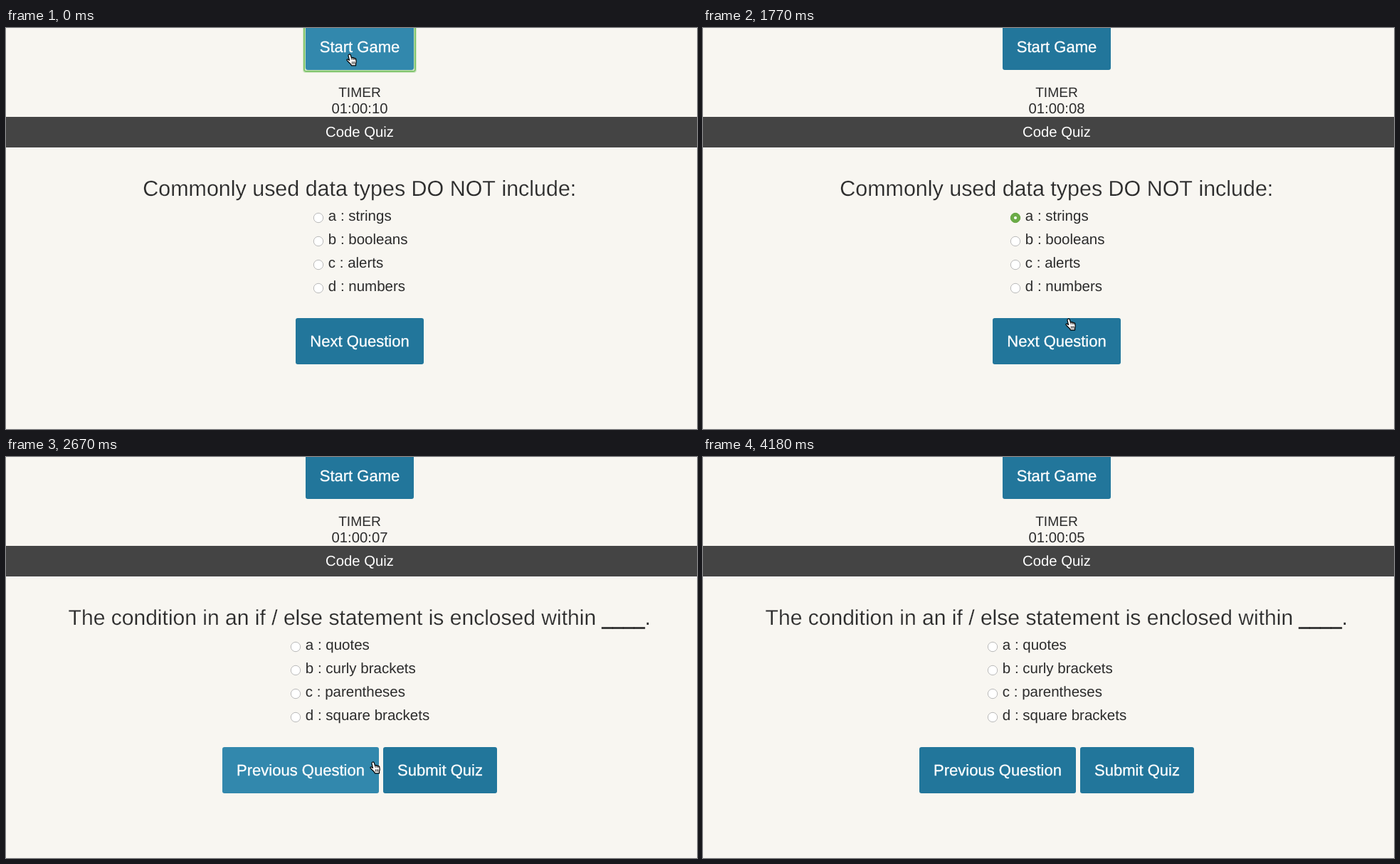
Recreate the animation shown at these times as an HTML page. Size 971 by 564 pixels, loop 4280 ms.

```html
<!DOCTYPE html>
<html lang="en">
<head>
<meta charset="utf-8">
<title>Code Quiz</title>
<style>
  html, body { margin: 0; width: 100%; height: 100%; overflow: hidden; background: #f8f6f1; }
  svg { display: block; width: 971px; height: 564px; }
  text {
    font: 20.3px "Liberation Sans", Arial, sans-serif;
    font-kerning: none; text-rendering: geometricPrecision;
    fill: #2b2b2b;
  }
  .mid { text-anchor: middle; }
  .bar { fill: #fff; }
  .question { stroke: #f8f6f1; stroke-width: .25px; /* thins the large letters */ }
  .blank { font-size: 27px; stroke: #2b2b2b; stroke-width: .6px; }
  .answer { font-size: 20.5px; }
  .button text { font-size: 22px; fill: #fff; stroke: #fff; stroke-width: .3px; text-anchor: middle; }
  .button .face { fill: #22769b; }
  .button.hover .face { fill: #3288ad; }
  .ring { fill: none; visibility: hidden; }
  .focus .ring { visibility: visible; }
  .radio { fill: #fff; stroke: #b9b9b9; }
  .radio.pressed { fill: #e2e2e2; stroke: #9c9c9c; }
  .radio.turning { fill: #98c680; stroke: #8cba74; }
  .radio.checked { fill: #6cac48; stroke: #64a441; }
</style>
</head>
<body>
<svg id="stage" viewBox="0 0 971 564">
  <rect width="971" height="564" fill="#f8f6f1"/>
  <rect y="125" width="971" height="43" fill="#444"/>
  <text class="mid" x="497" y="96.5" style="font-size:19.2px">TIMER</text>
  <text class="mid" x="497" y="119.7" id="timer"></text>
  <text class="mid bar" x="497" y="153">Code Quiz</text>
  <g id="slides"></g>
  <g id="buttons"></g>
  <g id="arrow">
    <path d="M1.7 1.3v14.9l3.5-3.3 2.2 5.1 2.6-1.1-2.2-4.9h4.5z" fill="#000" stroke="#fff"/>
  </g>
  <g id="hand" stroke="#000" stroke-linejoin="round" stroke-linecap="round">
    <path d="M4 1.2c1-.6 2 0 2.3.9l1.3 4.1c.5-.9 1.8-.8 2.2.1.6-.6 1.7-.4 2 .5.7-.5 1.8-.1 1.9.9l.5 3.3c.2 1.5-.6 2.3-.7 3.6l.1 2.2H7.4c-.5-2.1-2.5-3.2-4-4.8L1.2 9.6c-.7-1 .4-2.1 1.5-1.4l1.8 1.2L3 3.2c-.2-.9.2-1.6 1-2z" fill="#fff" stroke-width="1.2"/>
    <path d="M7.6 6.4l.6 2.2M9.9 6.6l.5 2M11.9 7.1l.3 1.6M8.4 11.6v2.8M10.3 11.6v2.8M12 11.6v2.8" fill="none" stroke-width=".8"/>
  </g>
</svg>
<script>
const LOOP = 4280;
const $ = id => document.getElementById(id);

function add(parent, tag, attrs, content = "") {
  const node = document.createElementNS("http://www.w3.org/2000/svg", tag);
  for (const name in attrs) node.setAttribute(name, attrs[name]);
  node.innerHTML = content;
  return parent.appendChild(node);
}

function addSlide(question, x, size, left, answers) {
  const slide = add($("slides"), "g", {});
  add(slide, "text", { class: "question", x, y: 236, style: `font-size:${size}px` }, question);
  answers.forEach((answer, i) => {
    add(slide, "circle", { class: "radio", cx: left, cy: 267 + 33 * i, r: 6.7 });
    add(slide, "text", { class: "answer", x: left + 13.8, y: 271 + 33 * i }, `${"abcd"[i]} : ${answer}`);
  });
  return slide;
}

function addButton(label, x, y, width) {
  const group = add($("buttons"), "g", {});
  const box = (grow, attrs) => add(group, "rect", {
    x: x - grow, y: y - grow, width: width + 2 * grow, height: 65 + 2 * grow, rx: 3, ...attrs
  });
  box(3.2, { class: "ring", stroke: "#cfe5c4", "stroke-width": 1.5 });
  box(2, { class: "ring", stroke: "#83c56f", "stroke-width": 2 });
  box(.5, { class: "ring", stroke: "#c3e2b5" });
  box(0, { class: "face" });
  add(group, "text", { x: x + width / 2, y: y + 40 }, label);
  return group;
}

const first = addSlide("Commonly used data types DO NOT include:", 192.3, 30.45, 439,
  ["strings", "booleans", "alerts", "numbers"]);
const second = addSlide(
  'The condition in an if / else statement is enclosed within <tspan class="blank">____</tspan>.',
  87.6, 30.05, 407, ["quotes", "curly brackets", "parentheses", "square brackets"]);
const choice = first.querySelector(".radio");
const dot = add(first, "circle", { cx: 439, cy: 267, r: 2, fill: "#fff" });

const start = addButton("Start Game", 421, -6, 152);
const next = addButton("Next Question", 407, 408, 180);
const previous = addButton("Previous Question", 304, 408, 220);
const submit = addButton("Submit Quiz", 530, 408, 160);

// Each row holds from its time until the next row.
const cursor = [
  [0, "hand", 478, 36], [150, "arrow", 469, 98], [300, "arrow", 469, 164],
  [450, "arrow", 456, 202], [590, "arrow", 455, 247], [740, "arrow", 449, 271],
  [890, "arrow", 439, 269], [1040, "arrow", 425, 269], [1180, "arrow", 435, 268],
  [1480, "arrow", 436, 268], [1620, "arrow", 449, 286], [1770, "hand", 509, 408],
  [1920, "hand", 511, 420], [2070, "hand", 511, 428], [2820, "hand", 536, 425],
  [2970, "hand", 625.5, 414], [3110, "arrow", 772, 454], [3260, "arrow", 863, 539],
  [3410, "none", 0, 0]
];
const seconds = [[0, "10"], [150, "09"], [1180, "08"], [2070, "07"], [3110, "06"], [4180, "05"]];
const radioStates = [[0, ""], [1180, "pressed"], [1480, "turning"], [1620, "checked"]];
const fade = [[0, 0], [2370, .3], [2520, .8], [2670, 1]];

const at = (rows, t) => rows.findLast(row => row[0] <= t).slice(1);
const show = (node, on) => node.style.display = on ? "" : "none";
const setButton = (button, visible, hover, focus) => {
  show(button, visible);
  button.setAttribute("class", `button ${hover ? "hover" : ""} ${focus ? "focus" : ""}`);
};

function draw(t) {
  const [kind, x, y] = at(cursor, t);
  for (const name of ["hand", "arrow"]) {
    show($(name), kind === name);
    $(name).setAttribute("transform", `translate(${x} ${y})`);
  }

  $("timer").textContent = "01:00:" + at(seconds, t)[0];

  const [state] = at(radioStates, t);
  choice.setAttribute("class", "radio " + state);
  show(dot, state === "turning" || state === "checked");

  const [mix] = at(fade, t);
  first.style.opacity = 1 - mix;
  second.style.opacity = mix;

  const onSecond = t >= 2370;
  setButton(start, true, t < 150, t < 1180);
  setButton(next, !onSecond, t >= 1920, t >= 2220);
  setButton(previous, onSecond, t < 2820, false);
  setButton(submit, onSecond, t >= 2970 && t < 3110, false);
}

const began = performance.now();
function tick() {
  draw((performance.now() - began) % LOOP);
  requestAnimationFrame(tick);
}
tick();
</script>
</body>
</html>
```
